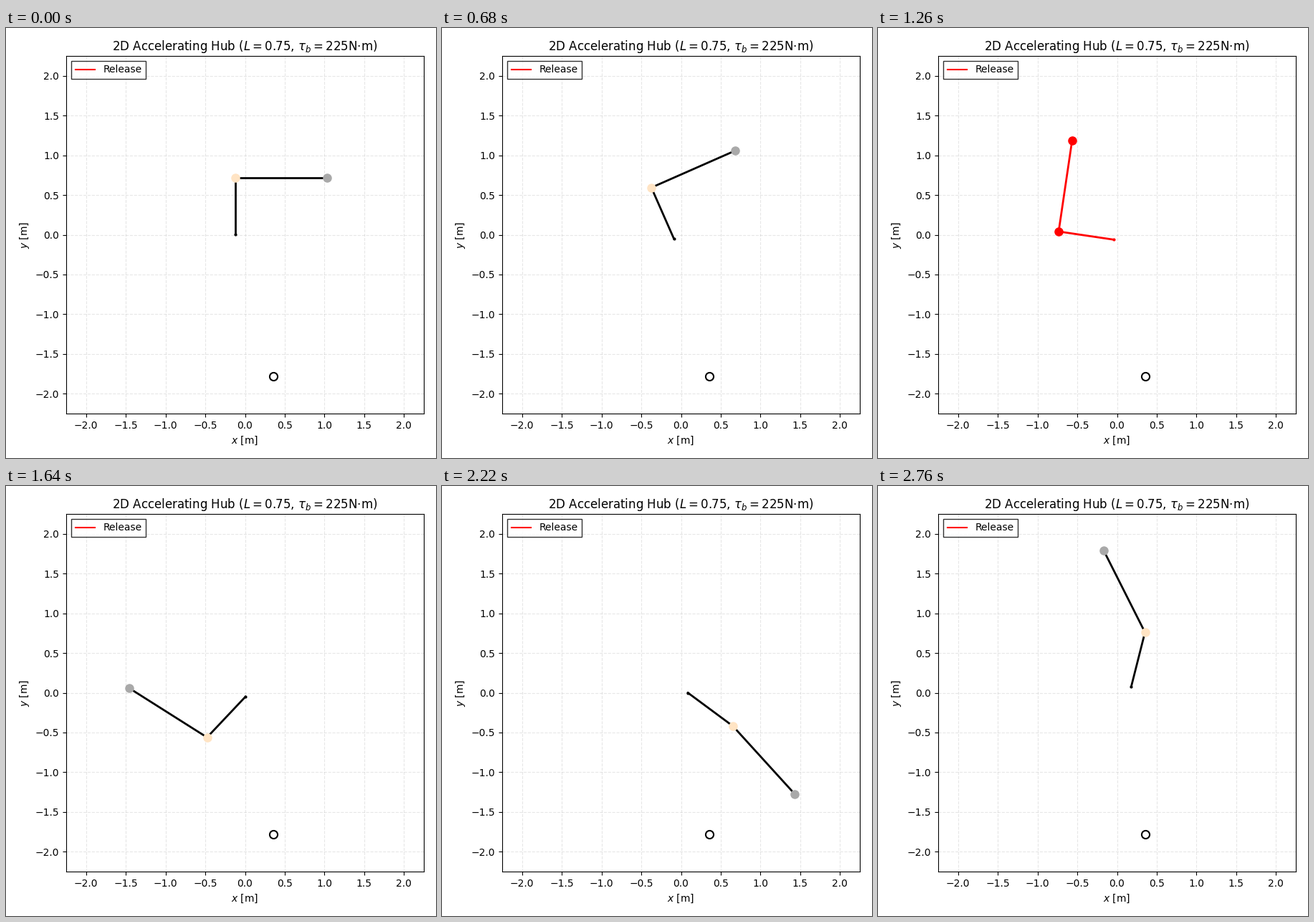
Write a matplotlib script that moves like this. It is 600 px wide and 600 px high and loops after 2780 ms.

```python
import numpy as np
import matplotlib.pyplot as plt
from matplotlib.animation import FuncAnimation

FRAMES, STEP = 139, 20
HUB_LEN, ARM_LEN = 0.704, 1.1545
RELEASE = 1.26       # s
HALF_ACCEL = 51.4    # deg/s^2, constant torque on the hub


def angles(t):
    """Hub and arm angles in degrees: locked at 90 apart, then the arm swings free."""
    s = max(t - RELEASE, 0)
    locked = min(t, RELEASE)
    start = 90 + HALF_ACCEL * locked ** 2
    coast = 2 * HALF_ACCEL * RELEASE * s
    hub = start + coast + s * s * (29.1 + 18 * (s - 1.17) ** 2)
    arm = start - 90 + coast + s * s * (119.6 - 41 * (s - 0.64) ** 2)
    return hub, arm


def ray(length, deg):
    a = np.radians(deg)
    return length * np.array([np.cos(a), np.sin(a)])


def pose(t):
    hub, arm = angles(t)
    pivot = np.array([-0.126 + 0.036 * t + 0.027 * t * t,
                      0.009 - 0.1244 * t + 0.0541 * t * t])
    joint = pivot + ray(HUB_LEN, hub)
    return pivot, joint, joint + ray(ARM_LEN, arm)


fig = plt.figure(figsize=(6, 6), dpi=100)
ax = fig.add_axes([84 / 600, 62 / 600, 499 / 600, 499 / 600])
ticks = np.arange(-2, 2.1, 0.5)
ax.set(xlim=(-2.25, 2.25), ylim=(-2.25, 2.25), xticks=ticks, yticks=ticks,
       xlabel="$x$ [m]", ylabel="$y$ [m]")
ax.set_title(r"2D Accelerating Hub ($L=0.75$, $\tau_b=225$N$\cdot$m)")
ax.grid(linestyle="--", alpha=0.3)

ax.plot([], [], "r-", label="Release")
ax.legend(loc="upper left", fancybox=False, edgecolor="black")
ax.plot(0.36, -1.785, "o", ms=8, mfc="none", mec="black", mew=1.5)

rods, = ax.plot([], [], lw=2, color="black")
dots = [ax.plot([], [], "o", ms=size)[0] for size in (2, 8, 8)]
COLORS = ("black", "bisque", "darkgray")


def update(n):
    points = pose(n * STEP / 1000)
    released = n == round(RELEASE * 1000 / STEP)
    rods.set_data(*zip(*points))
    rods.set_color("red" if released else "black")
    for dot, (x, y), color in zip(dots, points, COLORS):
        dot.set_data([x], [y])
        dot.set_color("red" if released else color)
    return [rods, *dots]


anim = FuncAnimation(fig, update, frames=FRAMES, interval=STEP,
                     repeat=True, repeat_delay=0)
plt.show()
```
